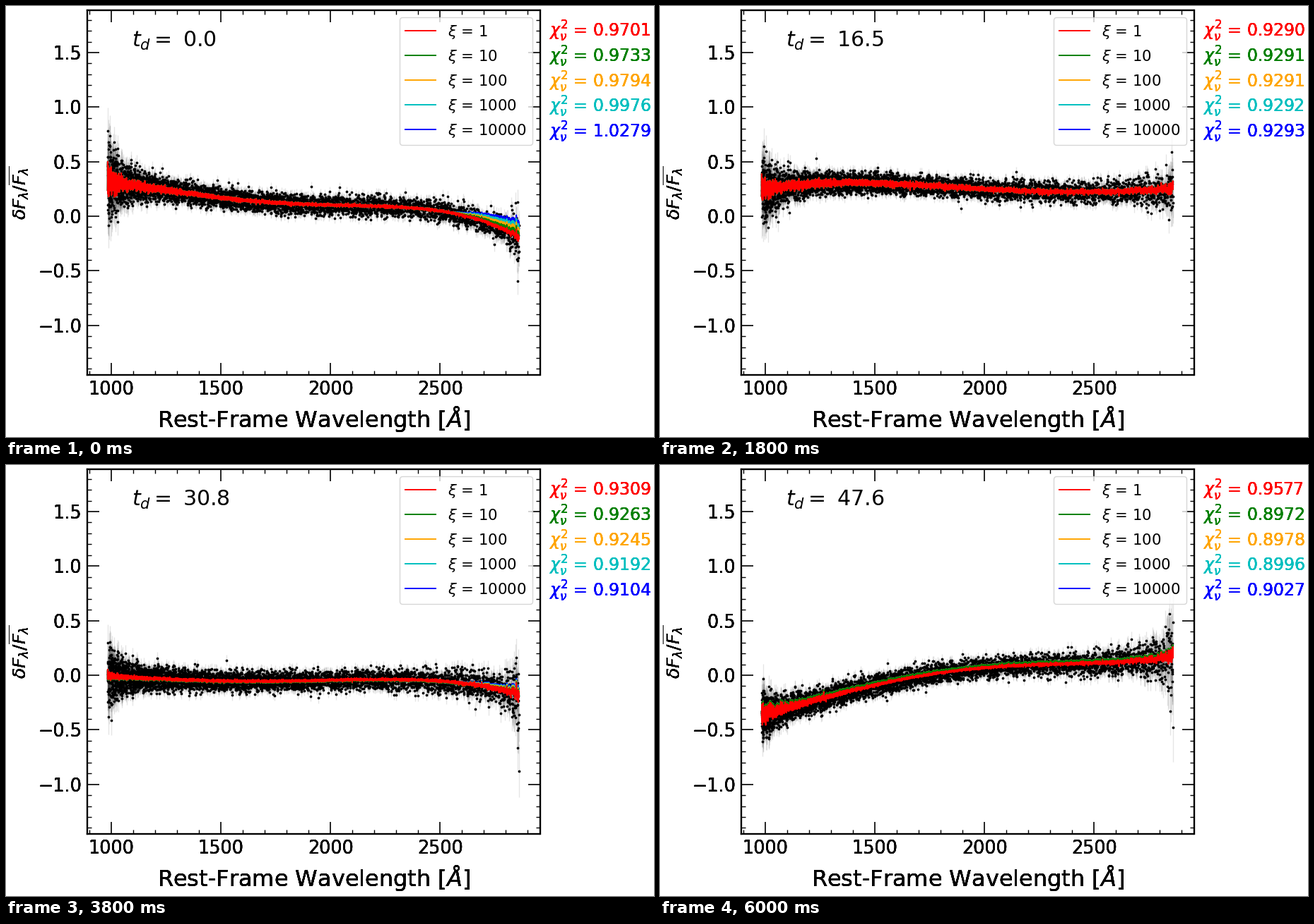
Animation of 917x611 px, one loop 6.2 s. Source, as a matplotlib script:

```python
import numpy as np
import matplotlib.pyplot as plt
from matplotlib.animation import FuncAnimation
from matplotlib.collections import LineCollection
from matplotlib.ticker import MultipleLocator

W, H, DPI = 917, 611, 100
FRAMES, INTERVAL = 31, 200
COPIES = 5  # labels are stacked to get their heavy edges
COLORS = ["red", "green", "orange", "c", "blue"]

# Key epochs: step, day, flux level at five wavelengths, chi of red, green, blue.
KNOTS = np.array([985, 1300, 1700, 2300, 2855])
EPOCHS = np.array([
    [0, 0.0, 0.31, 0.225, 0.13, 0.085, -0.185, 0.9701, 0.9733, 1.0279],
    [5, 10.2, 0.42, 0.345, 0.25, 0.175, 0.13, 0.9182, 0.9217, 0.9218],
    [9, 16.5, 0.24, 0.305, 0.285, 0.225, 0.25, 0.9290, 0.9291, 0.9293],
    [13, 23.4, 0.37, 0.235, 0.105, 0.065, -0.13, 1.0124, 0.9719, 0.9871],
    [19, 30.8, -0.01, -0.04, -0.055, -0.04, -0.17, 0.9309, 0.9263, 0.9104],
    [26, 40.7, -0.05, 0.085, 0.205, 0.28, 0.42, 1.3722, 0.9260, 0.9259],
    [30, 47.6, -0.36, -0.19, -0.01, 0.10, 0.17, 0.9577, 0.8972, 0.9027],
])

wave = 10 ** np.arange(np.log10(983), np.log10(2860), 1e-4)
rng = np.random.default_rng(4)
mean_noise, fit_noise = rng.standard_normal((2, wave.size))


def state(i):
    """Day, flux levels and chi values at step i."""
    day, *rest = [np.interp(i, EPOCHS[:, 0], col) for col in EPOCHS[:, 1:].T]
    return day, np.array(rest[:5]), rest[5:]


def spectrum(levels):
    """Quartic through the five levels."""
    scale = lambda x: (x - KNOTS[0]) / (KNOTS[-1] - KNOTS[0])
    return np.polyval(np.polyfit(scale(KNOTS), levels, 4), scale(wave))


def sigma(p):
    """Noise level: the blue edge calms down, the red edge grows over the loop."""
    a, b = wave - wave[0], wave[-1] - wave
    left = 0.13 * np.exp(-a / 45) + 0.035 * np.exp(-a / 200)
    right = 0.11 * np.exp(-b / 22) + 0.04 * np.exp(-b / 200)
    return 0.045 + (1.05 - 0.45 * p) * left + (0.6 + 1.2 * p) * right


def label(x, y, s, size, n=COPIES, **kw):
    """Text at stage pixels, y measured downwards."""
    return [fig.text(x / W, 1 - y / H, s, fontsize=size, **kw) for _ in range(n)]


def make_axes(ghost=False):
    left, right, top, bottom = 114.5, 755.5, 5.5, 523
    ax = fig.add_axes([left / W, 1 - bottom / H, (right - left) / W, (bottom - top) / H],
                      label=str(len(fig.axes)))
    ax.set(xlim=(888.7, 2955.5), ylim=(-1.455, 1.891))
    ax.xaxis.set_major_locator(MultipleLocator(500))
    ax.yaxis.set_major_locator(MultipleLocator(0.5))
    ax.tick_params(axis="x", labelsize=18.4, pad=6)
    ax.tick_params(axis="y", labelsize=18.4, pad=5.5)
    if ghost:
        ax.patch.set_visible(False)
        ax.spines[:].set_visible(False)
        ax.tick_params(length=0)
        return ax
    ax.xaxis.set_minor_locator(MultipleLocator(100))
    ax.yaxis.set_minor_locator(MultipleLocator(0.1))
    ax.tick_params(which="both", direction="in", top=True, right=True)
    ax.tick_params(which="major", length=12, width=1.2)
    ax.tick_params(which="minor", length=4.5, width=1)
    ax.spines[:].set_linewidth(1.7)
    return ax


fig = plt.figure(figsize=(W / DPI, H / DPI), dpi=DPI, facecolor="white")
ax = make_axes()
for _ in range(COPIES - 1):
    make_axes(ghost=True)

bars = LineCollection([], colors="black", alpha=0.1, linewidths=1, zorder=1)
ax.add_collection(bars, autolim=False)
dots, = ax.plot([], [], "o", color="black", ms=2.7, mew=0, zorder=1.5)
fits = [ax.plot([], [], color=c, lw=1.4, zorder=2 - 0.05 * k,
                label=rf"$\xi$ = {10 ** k}")[0] for k, c in enumerate(COLORS)]
ax.legend(handles=fits, loc="upper right", fontsize=15.3, labelspacing=0.52)

label(436, 597, r"Rest-Frame Wavelength [$\AA$]", 23, ha="center")
label(29, 264.5, r"$\delta F_\lambda / \overline{F_\lambda}$", 18,
      ha="center", va="baseline", rotation=90, rotation_mode="anchor")
clock, = label(178.5, 58, "", 21.6, n=1)
chis = [label(768.5, 43.7 + 35.7 * k, "", 17, color=c) for k, c in enumerate(COLORS)]


def update(i):
    day, levels, (red, green, blue) = state(i)
    base, err = spectrum(levels), sigma(i / (FRAMES - 1))
    noise = np.random.default_rng(100 + i).standard_normal(wave.size)
    flux = base + err * noise
    dots.set_data(wave, flux)
    ends = np.stack([flux - err, flux + err], axis=1)
    bars.set_segments(np.stack([np.repeat(wave[:, None], 2, axis=1), ends], axis=2))

    # The fits part at the red end of falling spectra; a poor red fit sits off the rest.
    rise = levels[-1] - levels[0]
    tail = 0.27 * max(-rise, 0) * np.clip((wave - 2560) / 300, 0, 1)
    lift = 0.067 * np.sqrt(max(red - green, 0)) * np.tanh(8 * rise)
    jitter = err * (0.95 * base * mean_noise + 0.12 * fit_noise)
    for k, (fit, texts) in enumerate(zip(fits, chis)):
        fit.set_data(wave, base + tail * k / 4 + (lift if k else 0) + jitter)
        chi = green + (blue - green) * ((k - 1) / 3) ** 2 if k else red
        for t in texts:
            t.set_text(rf"$\chi^2_\nu$ = {chi:.4f}")
    clock.set_text(rf"$t_d=$ {day:.1f}")
    return [bars, dots, *fits, clock]


anim = FuncAnimation(fig, update, frames=FRAMES, interval=INTERVAL,
                     repeat=True, repeat_delay=0, blit=False)
plt.show()
```
